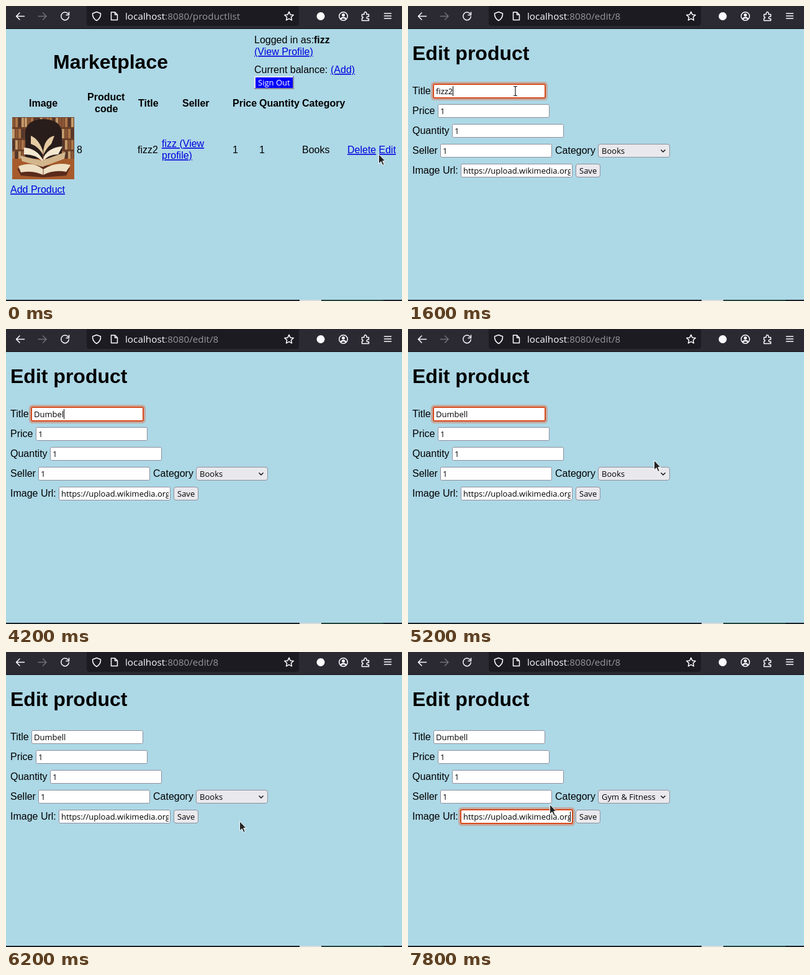
These frames come from a looping animation (638 by 475 pixels, 8000 ms). An HTML page:

```html
<!DOCTYPE html>
<html lang="en">
<head>
<meta charset="utf-8">
<title>Marketplace</title>
<style>
  html, body { margin: 0; width: 100%; height: 100%; overflow: hidden; background: #add8e6; }
  svg { display: block; width: 638px; height: 475px; }
  text { font: 16px "Liberation Sans", Arial, sans-serif; white-space: pre; }
  .h1 { font-size: 32px; font-weight: bold; }
  .bold { font-weight: bold; }
  .link { fill: #00d; text-decoration: underline; }
  .ui { font: 13px "Open Sans", sans-serif; }
  .url { font: 15.3px "Open Sans", sans-serif; fill: #fbfbfe; }
  .status { font: 14.3px "Open Sans", sans-serif; fill: #222; }
  .option { fill: #3a3a3a; }
  .dim { fill: #98979e; }
  .field { fill: #fff; stroke: #8f8f9d; }
  .hover { stroke: #5c5c68; }
  .button { fill: #e9e9ed; stroke: #8f8f9d; }
  .icon { fill: none; stroke: #fbfbfe; stroke-width: 1.5; stroke-linecap: round; stroke-linejoin: round; }
</style>
</head>
<body>
<svg viewBox="0 0 638 475">
  <defs>
    <clipPath id="photoClip"><rect x="10" y="179" width="100" height="100"/></clipPath>
    <clipPath id="urlClip"><rect x="86" y="255" width="176" height="20"/></clipPath>
  </defs>
  <rect width="638" height="475" fill="#add8e6"/>

  <g id="listPage">
    <g id="listText"></g>
    <rect x="400" y="113" width="64" height="21" fill="#00f"/>
    <path d="M401 134V114H464" fill="none" stroke="#e8e8ec" stroke-width="2"/>
    <path d="M400 133H463V113" fill="none" stroke="#8f8f9d" stroke-width="2"/>
    <text class="ui" x="406" y="128" fill="#fff">Sign Out</text>
    <g clip-path="url(#photoClip)">
      <rect x="10" y="179" width="100" height="100" fill="#6b4028"/>
      <g id="shelves"></g>
      <path d="M31 248V203Q33 183 60 182Q88 183 90 203V248Z" fill="#291d1b"/>
      <path d="M10 246H110V279H10Z" fill="#a75b2c"/>
      <path d="M18 262L55 255L103 261L97 273L60 276L24 273Z" fill="#5a2b1b"/>
      <path d="M20 258Q43 249 60 263Q81 250 104 256L97 267Q77 263 60 272Q42 264 24 268Z" fill="#eee0c4"/>
      <path d="M23 241L58 249L96 235L94 246L59 259L26 250Z" fill="#d3b68c"/>
      <path d="M29 228Q49 229 59 247Q66 228 91 226L84 239Q70 238 59 250Q46 238 29 239Z" fill="#f5e8d0"/>
      <path d="M40 209Q53 214 60 235Q62 212 78 209L73 222Q65 229 60 240Q52 226 40 222Z" fill="#e4cba3"/>
      <path d="M60 234V249M60 263V272" stroke="#815336"/>
    </g>
  </g>

  <g id="editPage">
    <g id="editText"></g>
    <g id="fields"></g>
    <g id="titleFocus">
      <rect x="38.5" y="123.5" width="185" height="27" rx="4" fill="none" stroke="#e95420" stroke-opacity=".35" stroke-width="3"/>
      <rect x="41" y="126" width="180" height="22" rx="2" fill="#fff" stroke="#d94a1c" stroke-width="2"/>
    </g>
    <g id="urlFocus">
      <rect x="82.5" y="251.5" width="185" height="27" rx="4" fill="none" stroke="#e95420" stroke-opacity=".35" stroke-width="3"/>
      <rect x="85" y="254" width="180" height="22" rx="2" fill="#fff" stroke="#d94a1c" stroke-width="2"/>
    </g>
    <rect id="selection" y="129" height="17" fill="#e95420"/>
    <text id="titleValue" class="ui" x="45" y="142"></text>
    <rect id="titleCaret" y="129" width="1" height="16"/>
    <text class="ui" x="89" y="270" clip-path="url(#urlClip)">https://upload.wikimedia.org/</text>
    <rect id="urlCaret" x="261" y="257" width="1" height="16"/>
    <rect class="button" x="306.5" y="222.5" width="115" height="21" rx="3.5"/>
    <text id="category" class="ui" x="312" y="238"></text>
    <path d="M407.5 231.5L411 235L414.5 231.5" fill="none" stroke="#111" stroke-width="1.5"/>
    <rect class="button" x="270.5" y="254.5" width="39" height="21" rx="3.5"/>
    <text class="ui" x="276" y="270">Save</text>
    <g id="menu">
      <rect x="305.5" y="244" width="116" height="128" rx="7" fill="#456" opacity=".25"/>
      <rect x="307" y="244" width="113.500" height="126.500" rx="6" fill="#fafafa"/>
      <rect id="highlight" x="310" width="107" height="24" rx="4" fill="#dcdcde"/>
      <g id="options"></g>
    </g>
  </g>

  <g id="statusBar">
    <path d="M0 451.500H191Q195.500 451.500 195.500 456V475H0Z" fill="#f8f8fa" stroke="#c4ccd0"/>
    <text id="statusText" class="status" x="3" y="468"></text>
  </g>
  <path d="M0 473H638V475H0Z" fill="#1b2228"/>
  <path d="M473 473H508V475H473Z" fill="#d5dadd"/>
  <path d="M508 473H608V475H508Z" fill="#24443f"/>

  <rect width="638" height="37" fill="#2b2a33"/>
  <rect y="36" width="638" height="1" fill="#0c0c0d"/>
  <path d="M130 0H472V28Q472 32 468 32H134Q130 32 130 28Z" fill="#1c1b22"/>
  <text class="url" x="192" y="22">localhost<tspan id="path" class="dim"></tspan></text>
  <g class="icon">
    <path d="M29.500 16.500H16.500M22 11L16.500 16.500L22 22"/>
    <path d="M52 16.500H65M59.500 11L65 16.500L59.500 22" stroke="#72717a"/>
    <g id="reload"><path d="M100 12.500A6.300 6.300 0 1 0 101.300 17M101.500 10V14.500H97"/></g>
    <path d="M146 9.500L152.500 12Q153 19.500 146 23.500Q139 19.500 139.500 12Z"/>
    <path d="M169.500 10H175.500L179.500 14V22.500H169.500ZM175.500 10V14H179.500"/>
    <path id="star"/>
    <circle cx="543.500" cy="16.500" r="6.800"/>
    <path d="M539.500 20.500Q543.500 17 547.500 20.500" stroke-width="2.500"/>
    <path d="M573.500 13.500H577V11.500Q579 7.500 581 11.500V13.500H584.500V17H582.500Q579.500 19 582.500 20.500H584.500V23.500H573.500V20Q577 18.500 573.500 17Z"/>
    <path d="M609.500 12H620.500M609.500 16H620.500M609.500 20H620.500"/>
  </g>
  <circle cx="543.500" cy="14.500" r="2.500" fill="#fbfbfe"/>
  <circle cx="507" cy="16.500" r="6.500" fill="#fbfbfe"/>

  <g id="cursor">
    <path id="arrow" d="M.5 .5V16L4.200 12.600L6.800 18.500L9.300 17.400L6.800 11.600H11Z" fill="#222" stroke="#fff"/>
    <g id="beam" fill="none">
      <path id="beamHalo" d="M-3 -7.500H-1L0 -6.500L1 -7.500H3M0 -6.500V6.500M-3 7.500H-1L0 6.500L1 7.500H3" stroke="#fff" stroke-width="3"/>
      <path d="M-3 -7.500H-1L0 -6.500L1 -7.500H3M0 -6.500V6.500M-3 7.500H-1L0 6.500L1 7.500H3" stroke="#222" stroke-width="1.200"/>
    </g>
    <path id="hand" d="M-1.500 1Q0 -1 1.500 1V6.500L9 8Q11 8.500 10.500 11L9 16.500H0L-4.500 10.500Q-4 8.500 -1.500 10.500ZM4 8V10M7 9V11" fill="#fff" stroke="#222" stroke-width="1.200"/>
  </g>
</svg>
<script>
const $ = id => document.getElementById(id);

function add(parent, tag, attrs, content = "") {
  const node = document.createElementNS("http://www.w3.org/2000/svg", tag);
  for (const key in attrs) node.setAttribute(key, attrs[key]);
  node.textContent = content;
  $(parent).append(node);
  return node;
}
const label = (parent, x, y, content, style = "") => add(parent, "text", { x, y, class: style }, content);
const show = (id, visible) => $(id).style.display = visible ? "" : "none";
const put = (id, content) => { if ($(id).textContent !== content) $(id).textContent = content; };

// Product list
label("listText", 76, 101, "Marketplace", "h1");
label("listText", 400, 60, "Logged in as:");
label("listText", 496, 60, "fizz", "bold");
label("listText", 400, 79, "(View Profile)", "link");
label("listText", 400, 108, "Current balance:");
label("listText", 523, 108, "(Add)", "link");
for (const [x, y, name] of [[37, 162, "Image"], [131, 152, "Product"], [143, 171, "code"], [213, 162, "Title"],
  [284, 162, "Seller"], [365, 162, "Price"], [408, 162, "Quantity"], [477, 162, "Category"]])
  label("listText", x, y, name, "bold");
for (const [x, value] of [[114, "8"], [212, "fizz2"], [365, "1"], [408, "1"], [477, "Books"]])
  label("listText", x, 237, value);
for (const [x, y, name] of [[251, 227, "fizz (View"], [251, 246, "profile)"], [550, 237, "Delete"],
  [600.5, 237, "Edit"], [7, 301, "Add Product"]])
  label("listText", x, y, name, "link");

// Book spines on the shelves of the photo
const spines = ["#8b5736", "#c39a6a", "#55382d", "#ad7649"];
for (let row = 0; row < 4; row++)
  for (let i = 0; i < 20; i++)
    add("shelves", "rect", { x: 10 + i * 5, y: 180 + row * 18, width: 4, height: 15, fill: spines[(i * 3 + row + (i >> 2)) % 4] });

// Edit form
label("editText", 7, 87, "Edit product", "h1");
label("editText", 237, 238, "Category");
const fields = [["Title", 41], ["Price", 48, "1"], ["Quantity", 71, "1"], ["Seller", 52, "1"], ["Image Url:", 85]]
  .map(([name, x, value = ""], i) => {
    const y = 126 + i * 32;
    label("editText", 7, y + 16, name);
    const box = add("fields", "rect", { x: x + .5, y: y + .5, width: 179, height: 21, rx: 2, class: "field" });
    label("fields", x + 4, y + 16, value, "ui");
    return box;
  });
["Books", "Gym & Fitness", "Technology", "Banned items", "Miscellaneous"]
  .forEach((name, i) => label("options", 316, 264 + i * 24, name, "ui option"));

const starPoints = Array.from({ length: 10 }, (_, i) => {
  const radius = i % 2 ? 3.6 : 7.6, angle = i * Math.PI / 5;
  return `${456 + radius * Math.sin(angle)} ${16.8 - radius * Math.cos(angle)}`;
});
$("star").setAttribute("d", `M${starPoints.join("L")}Z`);

// Pointer: start time, shape, x, y
const pointer = [
  [0, "arrow", 600, 238], [100, "hand", 609, 233], [600, "arrow", 607, 232], [1100, "arrow", 219, 146],
  [1300, "beam", 205, 142], [1400, "beam", 173, 137], [1800, "beam", 120, 134], [1900, "beam", 62, 127],
  [2000, "beam", 26, 123], [2200, "beam", 90, 130], [2300, "arrow", 250, 150], [2400, "arrow", 342, 169],
  [3200, "none", 0, 0], [4800, "arrow", 350, 174], [5000, "arrow", 362, 183], [5100, "arrow", 384, 200],
  [5200, "arrow", 396, 211], [5300, "arrow", 396, 237], [5800, "arrow", 409, 335], [6000, "arrow", 376, 272],
  [6700, "arrow", 395, 276], [6800, "beam", 389, 278], [6900, "arrow", 345, 272], [7000, "arrow", 285, 266],
  [7100, "beam", 225, 267], [7200, "beam", 186, 267], [7700, "beam", 205, 263], [7800, "arrow", 228, 245]
];
const keystrokes = [3200, 3500, 3900, 4000, 4100, 4200, 4400];
const between = (t, from, to) => t >= from && t < to;

function render(t) {
  const editing = t >= 400;
  show("listPage", !editing);
  show("editPage", editing);
  put("path", editing ? ":8080/edit/8" : ":8080/productlist");
  show("statusBar", between(t, 100, 600));
  put("statusText", editing ? "localhost" : "localhost:8080/edit/8");
  $("reload").setAttribute("transform", between(t, 300, 600) ? "matrix(-1 0 0 1 190 0)" : "");

  const typed = keystrokes.filter(time => t >= time).length;
  put("titleValue", typed ? "Dumbell".slice(0, typed) : "fizz2");
  const titleEnd = 45 + $("titleValue").getComputedTextLength();
  const selectFrom = t < 2000 ? 62 : 45;
  const selected = between(t, 1900, 3200);
  show("selection", selected);
  $("selection").setAttribute("x", selectFrom);
  $("selection").setAttribute("width", Math.max(0, titleEnd - selectFrom));
  $("titleValue").setAttribute("fill", between(t, 2000, 3200) ? "#fff" : "#000");
  show("titleFocus", between(t, 1600, 5400));
  show("titleCaret", between(t, 1600, 1900) || between(t, 3200, 5000));
  $("titleCaret").setAttribute("x", Math.round(titleEnd));
  fields[0].classList.toggle("hover", between(t, 1300, 2000));
  fields[4].classList.toggle("hover", t >= 6800);

  show("menu", between(t, 5400, 6200));
  $("highlight").setAttribute("y", t < 5800 ? 247 : 271);
  put("category", t < 6500 ? "Books" : "Gym & Fitness");
  show("urlFocus", t >= 7300);
  show("urlCaret", t >= 7700);

  const [, shape, x, y] = pointer.findLast(([start]) => t >= start);
  for (const id of ["arrow", "beam", "hand"]) show(id, id === shape);
  $("cursor").setAttribute("transform", `translate(${x} ${y})`);
}

function frame() {
  render(performance.now() % 8000);
  requestAnimationFrame(frame);
}
frame();
</script>
</body>
</html>
```
